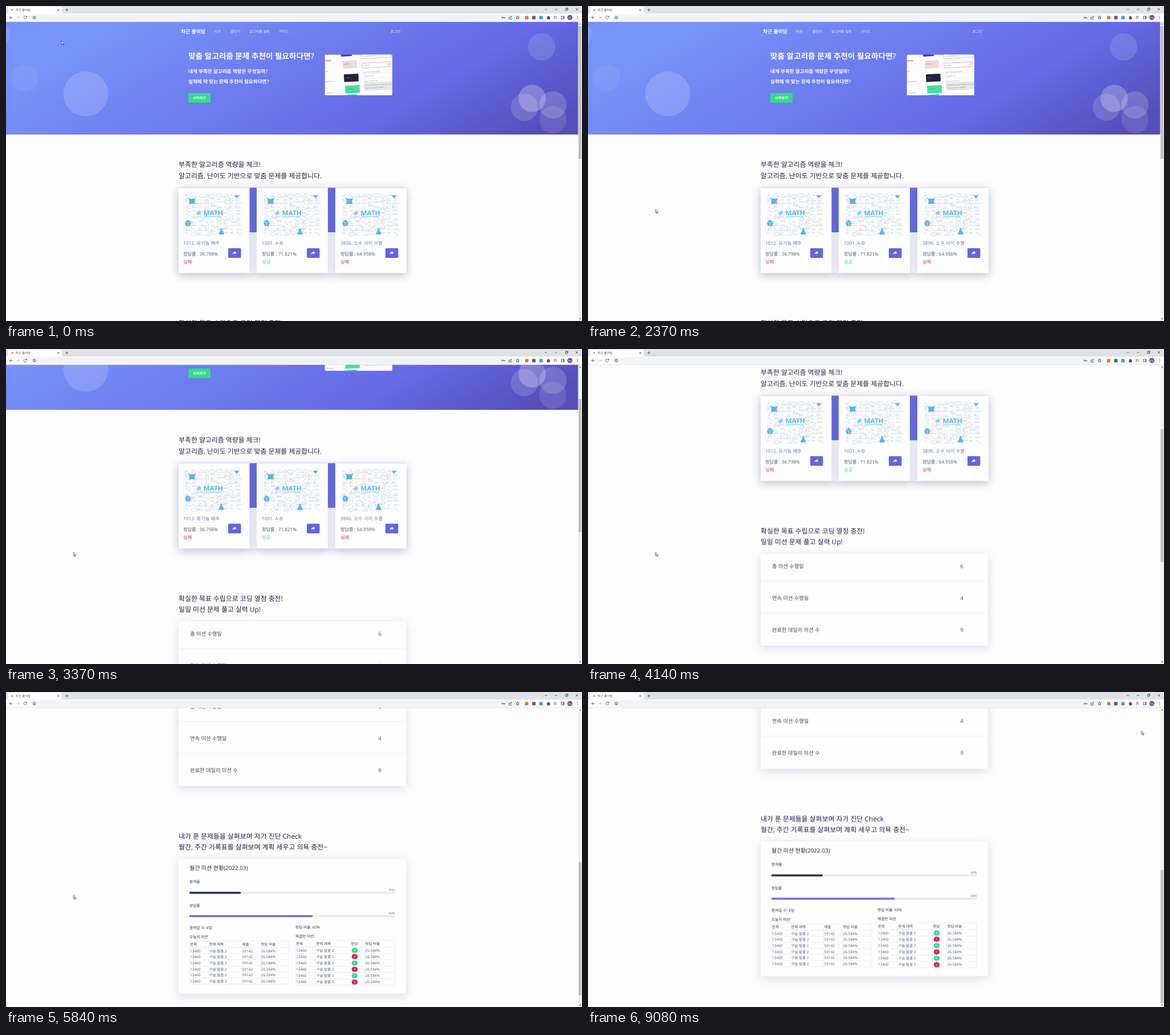
Recreate the animation shown at these times as an HTML page. Size 1011 by 554 pixels, loop 9110 ms.

```html
<!DOCTYPE html>
<html lang="ko">
<head>
<meta charset="utf-8">
<title>차근 풀이담</title>
<style>
html, body { margin: 0; width: 100%; height: 100%; overflow: hidden; background: #fdfdfd; }
#stage { display: block; width: 1011px; height: 554px; }
text { font-family: "Open Sans", "Noto Sans CJK KR", "Noto Sans CJK", sans-serif; text-rendering: geometricPrecision; }
.w { fill: #fff; }
.h { font-size: 11.9px; font-weight: 500; fill: #1d1d4c; }
.nav { font-size: 6.2px; fill: #f1f2ff; }
.lead { font-size: 8.58px; font-weight: 600; fill: #fff; }
.b { font-weight: 600; }
.item { font-size: 8.35px; }
.rate { font-size: 8.13px; fill: #4c5573; }
.row { font-size: 9.25px; fill: #3b3f63; }
.lbl { font-size: 6.7px; fill: #2b2e55; }
.cell { font-size: 6.5px; fill: #565d78; }
.pct { font-size: 5.6px; fill: #6f7585; text-anchor: end; }
.mark { font-size: 4.2px; font-weight: 600; fill: #fff; text-anchor: middle; }
.tiny { font-size: 2.6px; fill: #777; }
.card { fill: #fefefe; filter: drop-shadow(0 4px 8px rgba(70, 70, 140, .19)); }
.line { fill: none; stroke: #e6e8ef; stroke-width: .7; }
.ico { fill: none; stroke: #50545a; stroke-width: .9; }
#page, #thumb, #cursor { animation: 9.11s linear infinite; }
#page { animation-name: scroll; }
#thumb { animation-name: thumb; }
#cursor { animation-name: point; }
@keyframes scroll {
  0%, 33.7% { transform: translateY(0); animation-timing-function: ease-in-out; }
  36.66%, 42.92% { transform: translateY(-118.8px); animation-timing-function: ease-in-out; }
  45.33%, 49.07% { transform: translateY(-237.6px); animation-timing-function: ease-in-out; }
  54.34%, 58.29% { transform: translateY(-396px); animation-timing-function: ease-in-out; }
  63.67%, 64.54% { transform: translateY(-594px); animation-timing-function: ease-in-out; }
  66.41%, 100% { transform: translateY(-624.6px); }
}
@keyframes thumb {
  0%, 33.7% { transform: translateY(0); animation-timing-function: ease-in-out; }
  36.66%, 42.92% { transform: translateY(52.9px); animation-timing-function: ease-in-out; }
  45.33%, 49.07% { transform: translateY(105.8px); animation-timing-function: ease-in-out; }
  54.34%, 58.29% { transform: translateY(176.2px); animation-timing-function: ease-in-out; }
  63.67%, 64.54% { transform: translateY(264.4px); animation-timing-function: ease-in-out; }
  66.41%, 100% { transform: translateY(278px); }
}
@keyframes point {
  0%, .44% { transform: translate(97.5px, 61px); }
  2.63%, 8.12% { transform: translate(101px, 68px); animation-timing-function: ease-in-out; }
  13.17%, 16.3% { transform: translate(211px, 237px); }
  17.23%, 83.4% { transform: translate(118.5px, 357.5px); animation-timing-function: ease-in-out; }
  94.4%, 100% { transform: translate(971.5px, 68.5px); }
}
</style>
</head>
<body>
<svg id="stage" viewBox="0 0 1011 554">
  <defs>
    <linearGradient id="sky" gradientUnits="userSpaceOnUse" x1="333.6" y1="-164.6" x2="670.4" y2="418.6">
      <stop offset=".15" stop-color="#7793f8"/><stop offset=".7" stop-color="#666ae6"/><stop offset=".94" stop-color="#554fba"/>
    </linearGradient>
    <g id="math">
      <rect x="311" y="328" width="102" height="77" fill="#fbfcfd"/>
      <g id="doodles" fill="none" stroke="#a9b3bd" stroke-width=".45"></g>
      <g fill="#55b7e6">
        <path d="M319 337l4 2h7l4-2-3 5 1 6h-11l1-6z"/>
        <path d="M400.500 333h9l-4.500 5.500z"/>
        <circle cx="319.500" cy="382" r="5.200"/>
        <path d="M376.500 391h3v3l3 5.500q.5 2.500-2 2.500h-5q-2.500 0-2-2.500l3-5.500z"/>
        <path d="M334 363l5-2.500 3 2-1 4-5 1z" opacity=".65"/>
        <text x="346.500" y="368" font-size="11.800" font-weight="700">MATH</text>
        <path d="M347 370h31v.8h-31z"/>
      </g>
      <path d="M319.500 382l4-3M319.500 382v5M319.500 382l-4-3" stroke="#fff" stroke-width=".6"/>
    </g>
  </defs>

  <rect width="1011" height="554" fill="#fdfdfd"/>
  <g id="page">
    <rect y="28" width="1004.500" height="198" fill="url(#sky)"/>
    <g id="bubbles" class="w"></g>
    <text class="w b" x="307" y="48" font-size="8.850">차근 풀이담</text>
    <g class="nav">
      <text x="365" y="47">미션</text><text x="394" y="47">캘린더</text><text x="427" y="47">알고리즘 설명</text>
      <text x="479" y="47">가이드</text><text x="675" y="47">로그인</text>
    </g>
    <text class="w b" x="320" y="92.500" font-size="13.640">맞춤 알고리즘 문제 추천이 필요하다면?</text>
    <text class="lead" x="320" y="117.500">내게 부족한 알고리즘 역량은 무엇일까?</text>
    <text class="lead" x="320" y="135.500">실력에 딱 맞는 문제 추천이 필요하다면?</text>
    <rect x="320" y="153" width="39" height="17" rx="1.500" fill="#33dc8b"/>
    <text class="w b" x="328" y="164" font-size="6.250">시작하기</text>

    <svg x="559.500" y="85.500" width="118.500" height="71.500" viewBox="559.500 85.500 118.500 71.500">
      <rect x="559.500" y="85.500" width="118.500" height="71.500" rx="1.500" fill="#fdfdfd"/>
      <g transform="rotate(-3 618 121)">
        <text class="b" x="560" y="94.500" font-size="3.200" fill="#333">Subtitle</text>
        <text class="tiny" x="559" y="113">Body</text><text class="tiny" x="559" y="131">Small text here</text><text class="tiny" x="561" y="151">Quote text</text>
        <rect x="590" y="80" width="19" height="7.500" rx="1" fill="#3c37a0"/>
        <rect x="592" y="95" width="25" height="14" rx="1" fill="#f1d7dc"/>
        <rect x="593" y="119" width="25.500" height="13.500" rx="1" fill="#25213f"/>
        <rect x="594" y="139" width="25.500" height="13.500" rx="1" fill="#45dfa0"/>
        <rect x="595" y="155" width="19" height="8" rx="1" fill="#4cc6d8"/>
        <text class="tiny b" x="595" y="102">WHITE</text><text class="tiny w b" x="596" y="126">DARK</text><text class="tiny w b" x="597" y="146">SUCCESS</text>
        <g fill="#fff" stroke-width=".7">
          <rect x="626" y="85" width="52" height="8" rx="1" stroke="#62dca8"/>
          <rect x="626" y="101" width="50" height="8.500" rx="1" stroke="#ea8aa9"/>
          <rect x="627" y="120" width="51" height="8" rx="1" stroke="#e8e8ec"/>
          <rect x="628" y="136" width="54" height="13" rx="1" fill="#e4e7ea" stroke="#d5d9dd"/>
        </g>
        <circle cx="672" cy="105.200" r="1.500" fill="none" stroke="#e86f95" stroke-width=".5"/>
        <text class="tiny" x="629" y="90">success@form.test</text><text class="tiny" x="629" y="106">Blocked</text>
        <text class="tiny" x="627" y="118">Select an example option</text><text class="tiny" x="629" y="125">Regular input</text>
        <text class="tiny" x="627" y="134">Longer example text</text><text class="tiny" x="630" y="141">Lorem ipsum dolor sit amet, elit sed do</text>
        <text class="tiny" x="630" y="146">eiusmod tempor ut labore</text>
      </g>
    </svg>

    <text class="h" x="303" y="283">부족한 알고리즘 역량을 체크!</text>
    <text class="h" x="303" y="302.500">알고리즘, 난이도 기반으로 맞춤 문제를 제공합니다.</text>
    <rect x="303" y="319.500" width="399" height="150" class="card" style="fill:#f6f6fa"/>
    <rect x="304" y="319.500" width="397" height="78.500" fill="#656cdf"/>
    <g id="cards"></g>

    <text class="h" x="303" y="561.500">확실한 목표 수립으로 코딩 열정 충전!</text>
    <text class="h" x="303" y="581">일일 미션 문제 풀고 실력 Up!</text>
    <rect class="card" x="303" y="598" width="399" height="161.500"/>
    <path class="line" d="M303 646h399M303 702h399"/>
    <g class="row">
      <text x="323" y="622.500">총 미션 수행일</text><text x="653.500" y="622.500">6</text>
      <text x="323" y="678.500">연속 미션 수행일</text><text x="653.500" y="678.500">4</text>
      <text x="323" y="734.500">완료한 데일리 미션 수</text><text x="653.500" y="734.500">9</text>
    </g>

    <text class="h" x="303" y="851.500">내가 푼 문제들을 살펴보며 자가 진단 Check</text>
    <text class="h" x="303" y="871">월간, 주간 기록표를 살펴보며 계획 세우고 의욕 충전~</text>
    <rect class="card" x="303" y="887.500" width="399" height="237"/>
    <text x="322" y="907" font-size="9.950" font-weight="500" fill="#1d1d4c">월간 미션 현황(2022.03)</text>
    <text class="lbl" x="322" y="930">참여율</text><text class="pct" x="682.500" y="943.500">40%</text>
    <rect x="322" y="945.500" width="360.500" height="3.300" rx="1" fill="#e6e8ee"/>
    <rect x="322" y="945.500" width="90" height="3.300" rx="1" fill="#1b2149"/>
    <text class="lbl" x="322" y="971.500">정답률</text><text class="pct" x="682.500" y="984.500">60%</text>
    <rect x="322" y="986.500" width="360.500" height="3.300" rx="1" fill="#e6e8ee"/>
    <rect x="322" y="986.500" width="216" height="3.300" rx="1" fill="#636bdc"/>
    <g class="lbl" font-weight="500">
      <text x="322" y="1011">참여일 수: 4일</text><text x="508" y="1009.500">정답 비율: 60%</text>
      <text x="322" y="1027">오늘의 미션</text><text x="508" y="1025.500">해결한 미션</text>
    </g>
    <g id="tables"></g>
  </g>

  <rect x="1004.500" y="28" width="6.500" height="526" fill="#f1f1f1"/>
  <rect id="thumb" x="1005" y="35" width="5" height="234" fill="#c1c1c1"/>
  <path d="M1006 32.500h3.400l-1.700-2zM1006 549.500h3.400l-1.700 2z" fill="#555"/>

  <rect width="1011" height="14" fill="#dee1e6"/>
  <path d="M0 13.500q3 0 3-3V4q0-3 3-3h89q3 0 3 3v6.500q0 3 3 3z" fill="#fff"/>
  <rect y="13.300" width="1011" height="14.200" fill="#fff"/>
  <rect y="27.300" width="1011" height=".8" fill="#d9dbdf"/>
  <circle cx="11" cy="7" r="1.600" fill="#e0705c"/>
  <text x="17" y="8.800" font-size="5.350" fill="#45494d">차근 풀이담</text>
  <g class="ico">
    <path d="M90 5.200l3.400 3.400M93.400 5.200L90 8.600M104.300 6.800h5M106.800 4.300v5"/>
    <path d="M945.700 5l2 2 2-2M963.500 6h4.200M982 4.800h3.200V8H982zM983 4.600v-1h3.200V7h-1M1000 4l4 4M1004 4l-4 4"/>
    <path d="M11.800 20.300H6.500M9 17.800l-2.500 2.500L9 22.800"/>
    <path d="M18.500 20.300h5.300M21.300 17.800l2.500 2.500-2.500 2.500" stroke="#b4b7bb"/>
    <path d="M36.200 19A2.600 2.600 0 1 0 36.300 21.300M36.600 17.300v2h-2"/>
  </g>
  <rect x="43" y="14.700" width="862" height="11.500" rx="5.700" fill="#f1f3f4"/>
  <g class="ico" stroke-width=".7">
    <circle cx="49.700" cy="20.300" r="2.400"/><path d="M49.700 19.800v2M49.700 18.500v.7"/>
    <circle cx="871.500" cy="20.300" r="1.200"/><path d="M872.700 20.300h3.200v1.300M874.300 20.300v1.200"/>
    <path d="M884.300 19h-1.500v4h4.700v-1M884.500 21.300q.2-2.300 3-2.400M886.300 17.300l1.500 1.600-1.500 1.500"/>
    <path d="M898 17.300l.9 2 2.100.2-1.600 1.400.5 2.100-1.900-1.100-1.900 1.100.5-2.100-1.600-1.400 2.100-.2z"/>
    <path d="M961.500 18.300h5M961.500 20.300h3.200M961.500 22.300h2M966 20v2.500M974.700 18h5v4.700h-5zM978.500 18v4.700"/>
  </g>
  <rect x="911" y="17.500" width="6" height="6" fill="#ee7440"/>
  <rect x="923.500" y="17.500" width="6" height="6" fill="#5a6068"/>
  <rect x="936" y="17.500" width="6" height="6" fill="#3f9fe2"/>
  <path d="M949.500 18.500h1.500a1 1 0 0 1 2 0h1.300v1.700a1 1 0 0 1 0 2v1.300h-4.800z" fill="#50545a"/>
  <circle cx="989.700" cy="20.300" r="4.500" fill="#7747a5"/>
  <text class="w" x="989.700" y="21.700" font-size="3.400" text-anchor="middle">하늘</text>
  <path d="M1002.400 17.600h1.200v1.200h-1.200zM1002.400 19.800h1.200v1.200h-1.200zM1002.400 22h1.200v1.200h-1.200z" fill="#50545a"/>

  <path id="cursor" d="M0 0v6.500l1.500-1.300 1 2.300 1.100-.5-1-2.200h2z" fill="#fff" stroke="#222" stroke-width=".7"/>
</svg>
<script>
const put = (id, html) => document.getElementById(id).innerHTML = html;
const text = (cls, x, y, s, fill) =>
  `<text class="${cls}" x="${x}" y="${y}"${fill ? ` style="fill:${fill}"` : ''}>${s}</text>`;

let seed = 7;
const rnd = () => (seed = seed * 16807 % 2147483647) / 2147483647;

// x, y, radius, opacity
put('bubbles', [
  [-13, 50, 20, .1], [33, 127, 24, .06], [140, 154.5, 39.5, .16], [940, 72, 24, .13],
  [910, 178, 24, .15], [923.5, 162.5, 24, .24], [960, 174, 24, .17], [960, 200, 24, .11]
].map(([x, y, r, o]) => `<circle cx="${x}" cy="${y}" r="${r}" opacity="${o}"/>`).join(''));

// Chalkboard scribbles that keep clear of the word in the middle
function doodles() {
  const formulas = ['a²+b²=c²', 'y=kx+b', 'sin x', 'Σ xₙ', '3+5=8', '√2π', 'f(x)=x²'];
  let out = '';
  for (let row = 0; row < 11; row++) for (let col = 0; col < 9; col++) {
    const x = 314 + col * 11 + rnd() * 3, y = 333 + row * 6.7 + rnd() * 2;
    const kind = Math.floor(rnd() * 7), size = 2 + rnd() * 2.5;
    if (x > 341 && x < 381 && y > 355 && y < 374) continue;
    if (kind < 3) {
      const s = formulas[Math.floor(rnd() * formulas.length)];
      out += `<text x="${x}" y="${y}" font-size="3" fill="#929ca6" stroke="none">${s}</text>`;
    } else if (kind === 3) out += `<ellipse cx="${x + 3}" cy="${y}" rx="${size * 1.3}" ry="${size * .7}"/>`;
    else if (kind === 4) out += `<path d="M${x} ${y + 2}h${size * 2.2}l-${size} -${size * 1.4}z"/>`;
    else if (kind === 5) out += `<path d="M${x} ${y}q2 -5 4 0t4 0"/>`;
    else out += `<path d="M${x} ${y + 2}v-6M${x - 1} ${y + 1}h9M${x} ${y}l6 -4"/>`;
  }
  return out;
}
put('doodles', doodles());

const red = '#d2386b', green = '#37d98b';
put('cards', [
  ['1012. 유기농 배추', '36.798%', '실패', red],
  ['1001. A-B', '71.821%', '성공', green],
  ['3896. 소수 사이 수열', '64.958%', '실패', red]
].map(([name, rate, result, color], i) => `<g transform="translate(${i * 138})">
  <rect class="card" x="${i ? 302 : 303}" y="319.500" width="${i ? 125 : 124.5}" height="150"/>
  <use href="#math"/>
  ${text('item', 311, 420, name, '#696fe0')}
  ${text('rate', 311, 438.5, '정답률 : ' + rate)}
  ${text('item', 311, 453.3, result, color)}
  <rect x="390" y="426" width="22.500" height="17" rx="1.500" fill="#5f68dc"/>
  <path class="w" d="M397.500 437q.2-4 3.700-4.200v-1.800l3.300 2.900-3.300 2.900v-1.800q-2.400 0-3.700 2z"/>
</g>`).join(''));

function table(cols, top, head, pitch, titles, cells) {
  const end = cols[cols.length - 1], bottom = top + head + 6 * pitch;
  let lines = cols.map(x => `M${x} ${top}V${bottom}`).join('') + `M${cols[0]} ${top}H${end}`;
  let out = titles.map((s, i) => text('cell', cols[i] + 1, top + 7.7, s, '#3c4265')).join('');
  for (let r = 0; r <= 6; r++) {
    const y = top + head + r * pitch;
    lines += `M${cols[0]} ${y}H${end}`;
    if (r === 6) break;
    cells.forEach((s, i) => {
      if (s) return out += text('cell', cols[i] + 1, y + 8, s);
      const cx = cols[i] + 7.5, cy = y + pitch / 2;
      out += `<rect x="${cx - 5.2}" y="${cy - 4.4}" width="10.400" height="8.800" rx="4.400" fill="${r % 2 ? '#d81e60' : '#35d98a'}"/>`
        + text('mark', cx, cy + 1.5, r % 2 ? 'X' : 'O');
    });
  }
  return `<path class="line" d="${lines}"/>` + out;
}
put('tables',
  table([322, 355.5, 413.5, 446.5, 496.5], 1032.5, 11, 10.7,
    ['문제', '문제 제목', '제출', '정답 비율'], ['13460', '구슬 탈출 2', '59142', '26.584%']) +
  table([508, 543.5, 604.5, 629.5, 682.5], 1031, 11.7, 11.15,
    ['문제', '문제 제목', '정답', '정답 비율'], ['13460', '구슬 탈출 2', '', '26.584%']));
</script>
</body>
</html>
```
